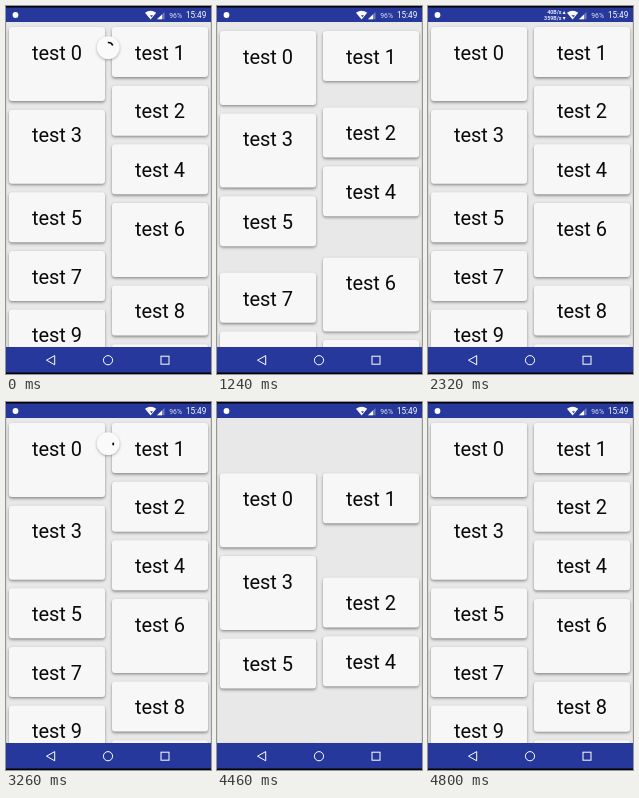
These frames come from a looping animation (205x368 px, 5080 ms). An HTML page with a canvas:

```html
<!DOCTYPE html>
<html lang="en">
<head>
<meta charset="utf-8">
<title>Staggered list refresh</title>
<style>
  html, body { margin: 0; width: 100%; height: 100%; overflow: hidden; background: #e8e8e8; }
  canvas { display: block; width: 205px; height: 368px; }
</style>
</head>
<body>
<canvas id="stage"></canvas>
<script>
const W = 205, H = 368, LOOP = 5080;
const TOP = 16, BOTTOM = 341;
const BLUE = '#26389c', FONT = 'Roboto, "Noto Sans", sans-serif';
const SHORT = 50, TALL = 74, GAP = 8.65;

const canvas = document.getElementById('stage');
const ctx = canvas.getContext('2d');
const dpr = window.devicePixelRatio || 1;
canvas.width = W * dpr;
canvas.height = H * dpr;

// Each column: [number, height, stagger group]
const columns = [
  { x: 3, items: [[0, TALL, 0], [3, TALL, 0], [5, SHORT, 0], [7, SHORT, 1], [9, TALL, 1]] },
  { x: 106, items: [[1, SHORT, 0], [2, SHORT, 1], [4, SHORT, 1], [6, TALL, 2], [8, SHORT, 2], [10, SHORT, 2]] }
];
const cards = columns.flatMap(({ x, items }) => {
  let y = 21;
  return items.map(([n, h, group]) => {
    const card = { n, x, y, h, group };
    y += h + GAP;
    return card;
  });
});

// spin: spinner starts turning, out: list cleared, enter: cards start rising
const refreshes = [
  { pull: -620, spin: -133, out: 754, enter: 796, angle: -135 },
  { pull: 2780, spin: 3270, out: 4066, enter: 4158, angle: -11 }
];

const clamp = v => Math.min(1, Math.max(0, v));
const lerp = (a, b, k) => a + (b - a) * k;
const span = (t, a, b) => clamp((t - a) / (b - a));
const rad = deg => deg * Math.PI / 180;

// cubic-bezier(.4, 0, .2, 1)
function fastOutSlowIn(x) {
  let lo = 0, hi = 1;
  for (let i = 0; i < 20; i++) {
    const u = (lo + hi) / 2, v = 1 - u;
    if (1.2 * v * v * u + 0.6 * v * u * u + u * u * u < x) lo = u; else hi = u;
  }
  return lo * lo * (3 - 2 * lo);
}

function shadow(color, blur, dy) {
  ctx.shadowColor = color;
  ctx.shadowBlur = blur * dpr;
  ctx.shadowOffsetY = dy * dpr;
}

function text(str, x, y, size, align = 'left', weight = 400) {
  ctx.font = `${weight} ${size}px ${FONT}`;
  ctx.textAlign = align;
  ctx.fillText(str, x, y);
}

function polygon(...pts) {
  ctx.beginPath();
  pts.forEach(([x, y]) => ctx.lineTo(x, y));
  ctx.closePath();
}

function disc(x, y, r) {
  ctx.beginPath();
  ctx.arc(x, y, r, 0, 2 * Math.PI);
}

function cardOffset(t, group) {
  const pass = refreshes.filter(r => t >= r.out).pop();
  if (!pass) return 0;
  const left = 1 - clamp((t - pass.enter - group * 75) / 500);
  return 324 * left * left;
}

function drawCard({ n, x, y, h }, dy) {
  y += dy;
  if (y > BOTTOM + 4) return;
  ctx.save();
  shadow('rgba(0,0,0,.42)', 3, 1.4);
  ctx.fillStyle = '#f7f7f7';
  ctx.beginPath();
  ctx.roundRect(x, y, 96, h, 3);
  ctx.fill();
  ctx.restore();
  ctx.fillStyle = '#0a0a0a';
  text('test ' + n, x + 48, y + 32.7, 20, 'center');
}

function drawSpinner(t) {
  const pass = refreshes.find(r => t >= r.pull && t < r.out + 150);
  if (!pass) return;
  let y = 41.6, start, sweep, alpha = 1;
  if (t < pass.spin) {
    const down = span(t, pass.pull, pass.pull + 280);
    const settle = fastOutSlowIn(span(t, pass.pull + 300, pass.spin));
    y = lerp(lerp(4, 60, down * (2 - down)), 41.6, settle);
    alpha = lerp(0.3, 1, span(t, pass.pull + 180, pass.pull + 300));
    start = pass.angle - 120 * (1 - down);
    sweep = lerp(10, lerp(240, 30, settle), down);
  } else {
    const age = t - pass.spin, turn = Math.floor(age / 1332), phase = age / 1332 - turn;
    const head = 288 * fastOutSlowIn(clamp(phase * 2));
    const tail = 288 * fastOutSlowIn(clamp(phase * 2 - 1));
    start = pass.angle + turn * 288 + tail + age * 0.304;
    sweep = head - tail + 30;
  }
  const scale = 1 - span(t, pass.out, pass.out + 150);
  ctx.save();
  ctx.translate(102.2, y);
  ctx.scale(scale, scale);
  ctx.save();
  shadow('rgba(0,0,0,.3)', 3, 1);
  ctx.fillStyle = '#fafafa';
  disc(0, 0, 11.4);
  ctx.fill();
  ctx.restore();
  ctx.globalAlpha = alpha;
  ctx.strokeStyle = '#000';
  ctx.lineWidth = 1.7;
  ctx.beginPath();
  ctx.arc(0, 0, 5.1, rad(start), rad(start + sweep));
  ctx.stroke();
  ctx.restore();
}

function drawStatusBar(t) {
  ctx.fillStyle = BLUE;
  ctx.fillRect(0, 0, W, TOP);
  ctx.fillStyle = '#000';
  ctx.fillRect(0, 0, W, 1.5);

  ctx.fillStyle = '#fff';
  disc(9.5, 9, 2.9);
  ctx.fill();

  // Wi-Fi fan with its activity mark
  ctx.beginPath();
  ctx.moveTo(144.6, 13.4);
  ctx.lineTo(139, 6.7);
  ctx.quadraticCurveTo(144.6, 3, 150.2, 6.7);
  ctx.closePath();
  ctx.fill();
  ctx.fillStyle = BLUE;
  const busy = t >= 2040 && t < 2830;
  polygon([busy ? 143.2 : 144, 9.2], [147, 9.2], [145.5, 11.2]);
  ctx.fill();

  // Mobile signal
  ctx.fillStyle = 'rgba(255,255,255,.35)';
  polygon([151, 13.3], [158.5, 13.3], [158.5, 6]);
  ctx.fill();
  ctx.fillStyle = '#fff';
  polygon([151, 13.3], [156, 13.3], [156, 8.5]);
  ctx.fill();

  text('15:49', 200.3, 12.4, 8.2, 'right');
  ctx.fillStyle = 'rgba(255,255,255,.85)';
  text('96%', 163.3, 12, 6.8);

  if (t >= 1830 && t < 2830) {
    ctx.fillStyle = '#fff';
    text('40B/s', 133.6, 8.3, 5.4, 'right', 500);
    text('359B/s', 133.6, 14.3, 5.4, 'right', 500);
    polygon([134.6, 8], [137.6, 8], [136.1, 5]);
    ctx.fill();
    polygon([134.6, 11], [137.6, 11], [136.1, 14]);
    ctx.fill();
  }
}

function drawNavBar() {
  ctx.fillStyle = BLUE;
  ctx.fillRect(0, BOTTOM, W, H - BOTTOM);
  ctx.fillStyle = '#000';
  ctx.fillRect(0, 366.5, W, 1.5);
  ctx.strokeStyle = '#fff';
  ctx.lineWidth = 1;
  polygon([40.5, 354.2], [48.7, 349.6], [48.7, 358.8]);
  ctx.stroke();
  disc(102, 354.2, 4.6);
  ctx.stroke();
  ctx.strokeRect(155, 350.2, 8, 8);
}

function draw(t) {
  ctx.setTransform(dpr, 0, 0, dpr, 0, 0);
  ctx.fillStyle = '#e8e8e8';
  ctx.fillRect(0, 0, W, H);
  ctx.fillStyle = '#d2d2d2';
  ctx.fillRect(0, TOP, 0.7, BOTTOM - TOP);
  ctx.fillRect(W - 0.7, TOP, 0.7, BOTTOM - TOP);

  ctx.save();
  ctx.beginPath();
  ctx.rect(0, TOP, W, BOTTOM - TOP);
  ctx.clip();
  cards.forEach(card => drawCard(card, cardOffset(t, card.group)));
  drawSpinner(t);
  ctx.restore();

  drawStatusBar(t);
  drawNavBar();
}

const began = performance.now();
function tick() {
  draw((performance.now() - began) % LOOP);
  requestAnimationFrame(tick);
}
tick();
</script>
</body>
</html>
```
